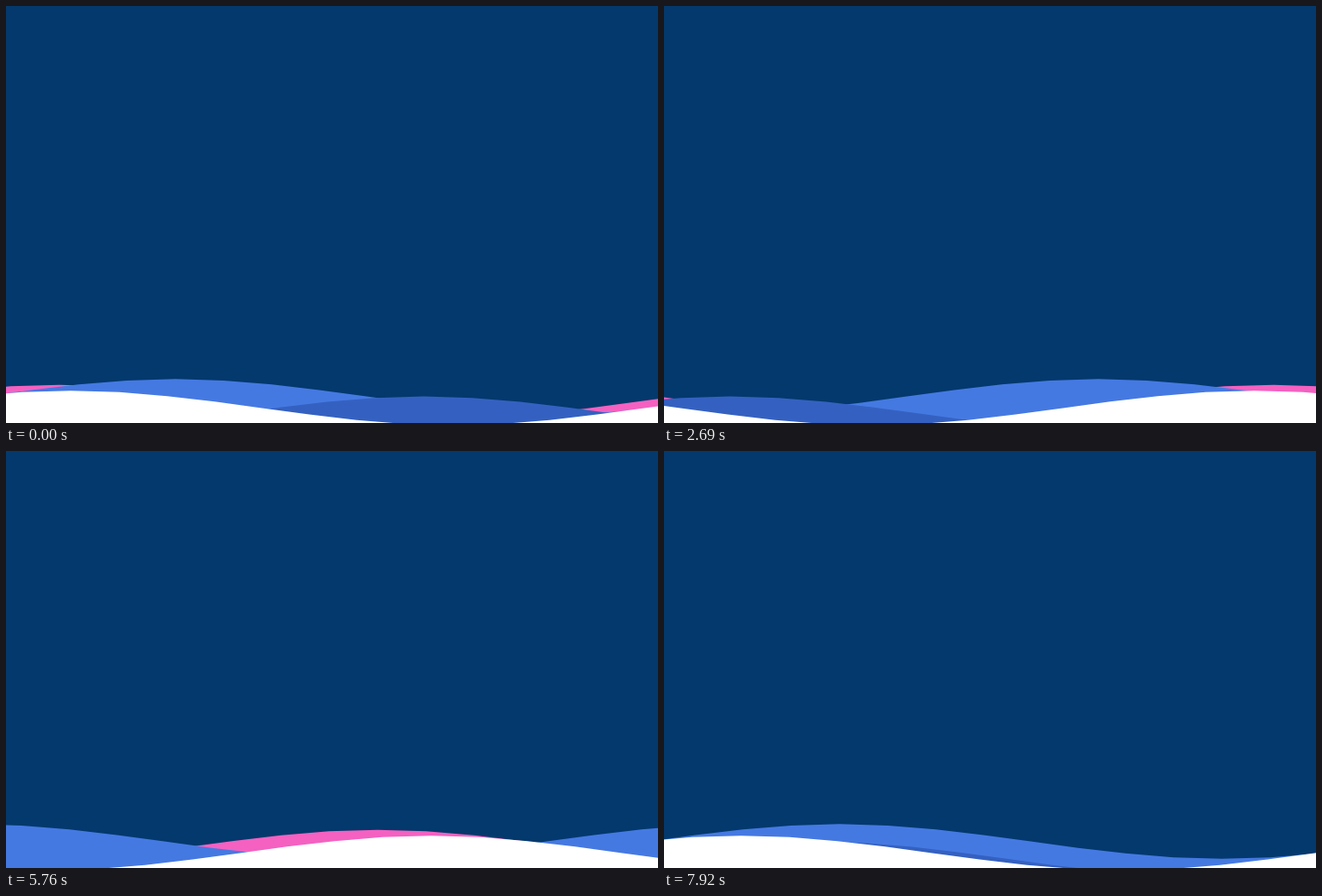
An HTML page with a canvas that plays this animation: 721 px wide and 462 px high, repeating every 7.99 s.

```html
<!DOCTYPE html>
<html lang="en">
<head>
<meta charset="utf-8">
<title>Waves</title>
<style>
  html, body { margin: 0; width: 100%; height: 100%; overflow: hidden; background: #03396c; }
  canvas { display: block; }
</style>
</head>
<body>
<canvas id="stage" width="721" height="462"></canvas>
<script>
const ctx = document.getElementById('stage').getContext('2d');
const W = 721, H = 462;
const LOOP = 7990, STEPS = 104;
const SX = W / 150, SY = 60 / 28, TOP = 409;   // wave units to pixels
const HALF = 88, RISE = 18, SEGMENTS = 8;

// Back to front: vertical offset, seconds per pass, direction
const layers = [
  { color: '#f461c1', y: 3, period: 10, dir: -1 },
  { color: '#4579e2', y: 0, period: 8, dir: 1 },
  { color: '#3461c1', y: 9, period: 6, dir: -1 },
  { color: '#ffffff', y: 6, period: 4, dir: 1 }
];

const bezier = (t, a, b, c, d) => {
  const u = 1 - t;
  return u * u * u * a + 3 * u * u * t * b + 3 * u * t * t * c + t * t * t * d;
};

function drawWave({ color, y, period, dir }, sec) {
  const p = (sec % period) / period;
  const shift = dir > 0 ? -90 + 175 * p : 85 - 175 * p;
  const left = -110 + shift;
  ctx.beginPath();
  ctx.moveTo(left * SX, H + 10);
  for (let i = 0; i < 4; i++) {
    const from = i % 2 ? 0 : RISE, to = RISE - from;
    for (let j = 0; j <= SEGMENTS; j++) {
      const t = j / SEGMENTS;
      const px = left + i * HALF + bezier(t, 0, 30, 58, HALF);
      const py = 2 + y + bezier(t, from, from, to, to);
      ctx.lineTo(px * SX, TOP + py * SY);
    }
  }
  ctx.lineTo((left + 4 * HALF) * SX, H + 10);
  ctx.fillStyle = color;
  ctx.fill();
}

function draw(now) {
  const step = Math.floor(((now % LOOP) + 5) / (LOOP / STEPS)) % STEPS;
  const sec = 22.9 + step * 0.0783;
  ctx.fillStyle = '#03396c';
  ctx.fillRect(0, 0, W, H);
  for (const layer of layers) drawWave(layer, sec);
}

let start = null;
function tick(now) {
  if (start === null) start = now;
  draw(now - start);
  requestAnimationFrame(tick);
}
draw(0);
requestAnimationFrame(tick);
</script>
</body>
</html>
```
